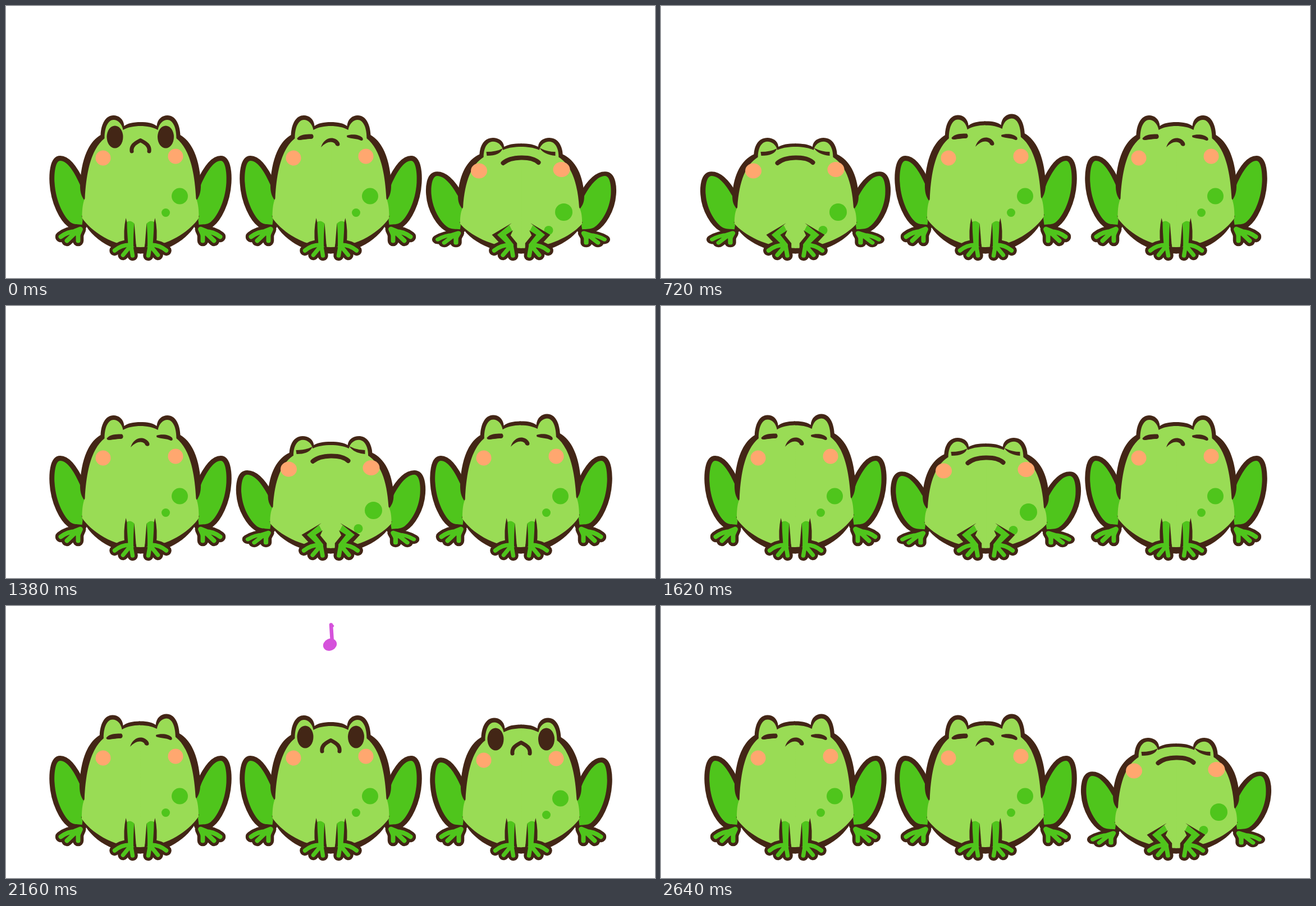
An HTML page for the animation above (2700 ms loop, 1156x485 px).

```html
<!DOCTYPE html>
<html lang="en">
<head>
<meta charset="utf-8">
<title>Frog trio</title>
<style>
html, body { margin: 0; width: 100%; height: 100%; overflow: hidden; background: #fff; }
svg { display: block; width: 1156px; height: 485px; }
.k { fill: #432616; }
.l { fill: #99dc55; }
.g { fill: #4fc51c; }
.p { fill: #ffa76f; }
.sk { fill: none; stroke: #432616; stroke-linecap: round; stroke-linejoin: round; }
.sg { fill: none; stroke: #4fc51c; stroke-linecap: round; stroke-linejoin: round; }
</style>
</head>
<body>
<svg id="stage" viewBox="0 0 1156 485"></svg>
<script>
const STEPS = 24, LOOP = 2700, FLOOR = 441;
const SHORT = [8, 15, 23];            // steps that last 60 ms instead of 120
const starts = [];
for (let i = 0, t = 0; i < STEPS; i++) {
  starts.push(t);
  t += SHORT.includes(i) ? 60 : 120;
}

// x: middle of the frog, lag and noteLag: steps behind, lift: height of its note
const frogs = [
  { x: 239.5, lag: 6, noteLag: 6, lift: 0, color: '#4a9cf5' },
  { x: 578.5, lag: 14, noteLag: 15, lift: -10, color: '#d552db' },
  { x: 917.5, lag: 0, noteLag: 0, lift: 10, color: '#ffa76f' }
];

const path = (cls, d, w) => `<path class="${cls}" d="${d}"${w ? ` stroke-width="${w}"` : ''}/>`;
const oval = (cls, x, y, rx, ry = rx) => `<ellipse class="${cls}" cx="${x}" cy="${y}" rx="${rx}" ry="${ry}"/>`;
const group = (t, s) => `<g transform="${t}">${s}</g>`;
const both = s => s + group('scale(-1 1)', s);
// scale about the floor line
const squash = (sx, sy) => `translate(0 ${FLOOR}) scale(${sx} ${sy}) translate(0 ${-FLOOR})`;

const THIGH = 'M98 345L108 318C116 300 129 276 143 276C152 276 154 300 153 315C151 350 135 378 124 386C118 390 112 389 104 390Z';
const HEEL = 'M107 398L117 402L111 407Z';
const BACK_TOES = 'M111 405L111 418.500M117 405L131 418.500M116 402Q129 402 142 411.500';
const FRONT_TOES = 'M17 427L14 445M18 428L31 444M19 426Q34 426 46 436';
const RIM = 'M-1 207C14 207 22 209 29 214C30 201 39 195 48 195C62 195 70 210 71 230C92 242 105 272 107.500 315C108 330 106 337 101 345L-1 345Z';
const BELLY_RIM = 'M105 374C96 408 53 441.500 -1 441.500L-1 374Z';
const SKIN = 'M-1 214C12 214 22 216 31 221C33 210 40 203 48 203C57 203 64 215 64 236C84 252 96 285 99 343C102 350 104 358 104 378C89 400 50 430 -1 430Z';

function hindLegs(p) {
  const foot = squash(p.squat ? p.sx : 1, p.squat ? p.sy : 1);
  const body = squash(p.sx, p.sy);
  return both(
    group(foot, path('sk', HEEL, 20) + path('sk', BACK_TOES, 19.5)) +
    group(body, path('sk', THIGH, 18) + path('g', THIGH)) +
    group(foot, path('g', HEEL) + path('sg', HEEL, 9) + path('sg', BACK_TOES, 8)));
}

function torso(p) {
  const lean = `translate(0 ${FLOOR}) matrix(1 ${-.02 * p.tall} ${.008 * p.tall} ${1 + .006 * p.tall} 0 0) translate(0 ${-FLOOR})`;
  return group(squash(p.sx, p.sy), group(lean,
    both(path('k', RIM) + path('k', BELLY_RIM)) + both(path('l', SKIN))));
}

function frontLegs(p) {
  const leg = p.squat
    ? path('g', 'M20 391L45 407L29 422L26 431L9 431L11 424L23 408L15 401Z') +
      path('k', 'M16 387L50 408L33 427L26 423L41 408Z') +
      path('k', 'M14 400L26 408L13 425L13 434L7 434L7 423L18 409Z')
    : path('g', 'M11 388Q18 380 26 386L24 430L9 430Z') +
      path('k', 'M11 387Q13 410 12.5 429L7.5 431Q9 410 11 387Z') +
      path('k', 'M26 378Q31 400 28 425L22 425Q24 400 24 386Z');
  return both(group(`scale(${p.squat ? 1.04 : 1} 1)`,
    path('sk', FRONT_TOES, 18.5) + leg + path('sg', FRONT_TOES, 7.5)));
}

function openFace(p) {
  const eyes = oval('k', -45.5, 233.5, 14.5, 20) + oval('k', 45, 233.5, 14.5, 20);
  let mouth;
  if (p.mouth === 'wide') mouth = oval('k', 0, 280.5, 28, 41);
  else if (p.mouth) {
    mouth = group(`translate(-1 255) scale(${p.mouth}) translate(0 -255)`,
      path('k', 'M-17 270C-22 250 -14 235.5 0 235.5C14 235.5 22 250 17 270Q17 276 12 275Q0 272 -12 275Q-17 276 -17 270Z'));
  } else mouth = path('sk', 'M-15.500 259C-17 248 -8 244 0 239.500C8 244 17 248 15.500 259', 7);
  return group(`translate(0 ${p.drop})`, eyes + mouth);
}

function restFace(p) {
  return group(`translate(${-p.tall} ${-p.tall})`,
    path('k', 'M-60 236C-54 228 -40 228.5 -33 228.5C-29 232 -31 237 -35 237C-43 237 -52 239 -56 239Q-60 239 -60 236Z') +
    path('k', 'M28.5 231C38 227.5 51 229 56.5 235Q59 240 54 240C46 236 38 237 29 234Z') +
    path('k', 'M-17.500 252C-14 240 -5 234.5 3 235.5C11 236.5 18 244 15.5 248.5C13 251 9 250 7.5 245.5C2 240 -8 242 -17.500 252Z'));
}

function squatFace(p) {
  return group(`translate(0 ${p.drop})`,
    path('k', 'M-62 260Q-44 260 -33 254Q-37 267 -61 267Z') +
    path('k', 'M33 253Q46 260 61 260L61 267Q40 265 33 253Z') +
    path('sk', 'M-32 280C-18 268 18 267 31 279', 8));
}

function marks(p) {
  if (p.squat) {
    return group(`translate(0 ${p.drop})`, oval('p', -75, 294, 14.5, 13.5) + oval('p', 72, 291.5, 15, 13.5) +
      oval('g', 76, 367.5, 15.5) + oval('g', 49, 400, 8));
  }
  const wide = p.mouth === 'wide' ? 4.5 : 0;
  return group(`translate(0 ${p.drop})`,
    oval('p', -66.5 - wide, 271, 13.5) + oval('p', 62.5 + wide, 268, 13.5)) +
    group(`translate(${wide} ${wide || p.drop})`, oval('g', 70, 339, 14.5) + oval('g', 45, 368.5, 7.5));
}

// the pose at a step of one frog's own cycle
function pose(s) {
  const p = { sx: 1, sy: 1, tall: 0, drop: 0, squat: false, face: restFace };
  if (s >= 22 || s < 2) {
    Object.assign(p, { squat: true, face: squatFace, sx: 1.045, sy: .837 });
    if (s === 1) Object.assign(p, { sx: 1.09, sy: .805, drop: 6 });
    if (s === 22) Object.assign(p, { sx: 1.04, sy: .85, drop: -3 });
  } else if (s === 2) {
    Object.assign(p, { face: openFace, mouth: 'wide', sx: .97, sy: 1.022, drop: -4 });
  } else if (s < 6) {
    Object.assign(p, { face: openFace, mouth: [1, .75, 0][s - 3] });
  } else if (s < 18) {
    // breathing: rest, rise, full, full
    p.tall = [0, .5, 1, 1][(s - 6) % 4];
  } else {
    p.face = openFace;
    p.drop = [0, 4, 12, 24][s - 18];
    p.sy = 1 - p.drop * 1.15 / 246;
  }
  return p;
}

// per step: head x, y, rx, ry, turn, stem base x, stem top x, y, flag length
const noteRows = {
  2: [-11, 89.5, 15, 11.5, 25, -11.5, -9.5, 48, 5],
  3: [0, 86.5, 12.5, 10.5, 0, 5.5, 6.5, 43, 12],
  4: [-1.5, 79, 12.5, 10.5, -25, 2.5, .5, 43.5, 2],
  5: [-1, 74, 8, 7, -25, 1, 0, 56, 1]
};

function note(step, f) {
  const r = noteRows[(step - f.noteLag + STEPS) % STEPS];
  if (!r) return '';
  const [x, y, rx, ry, turn, base, tx, ty, flag] = r;
  return `<g transform="translate(0 ${f.lift})" fill="${f.color}" stroke="${f.color}" stroke-linecap="round">
    <ellipse cx="${x}" cy="${y}" rx="${rx}" ry="${ry}" stroke="none" transform="rotate(${turn} ${x} ${y})"/>
    <path d="M${base} ${y - 4}L${tx} ${ty}" stroke-width="6.5"/>
    <path d="M${tx} ${ty}q3 2 3 ${flag}" fill="none" stroke-width="4.5"/></g>`;
}

function drawFrog(f, step) {
  const p = pose((step - f.lag + STEPS) % STEPS);
  return group(`translate(${f.x} 0)`,
    hindLegs(p) + torso(p) + marks(p) + p.face(p) + frontLegs(p) + note(step, f));
}

const stage = document.getElementById('stage');
const t0 = performance.now();
let shown = -1;

function tick() {
  const t = (performance.now() - t0) % LOOP;
  const step = starts.filter(v => v <= t).length - 1;
  if (step !== shown) {
    shown = step;
    stage.innerHTML = frogs.map(f => drawFrog(f, step)).join('');
  }
  requestAnimationFrame(tick);
}
tick();
</script>
</body>
</html>
```
